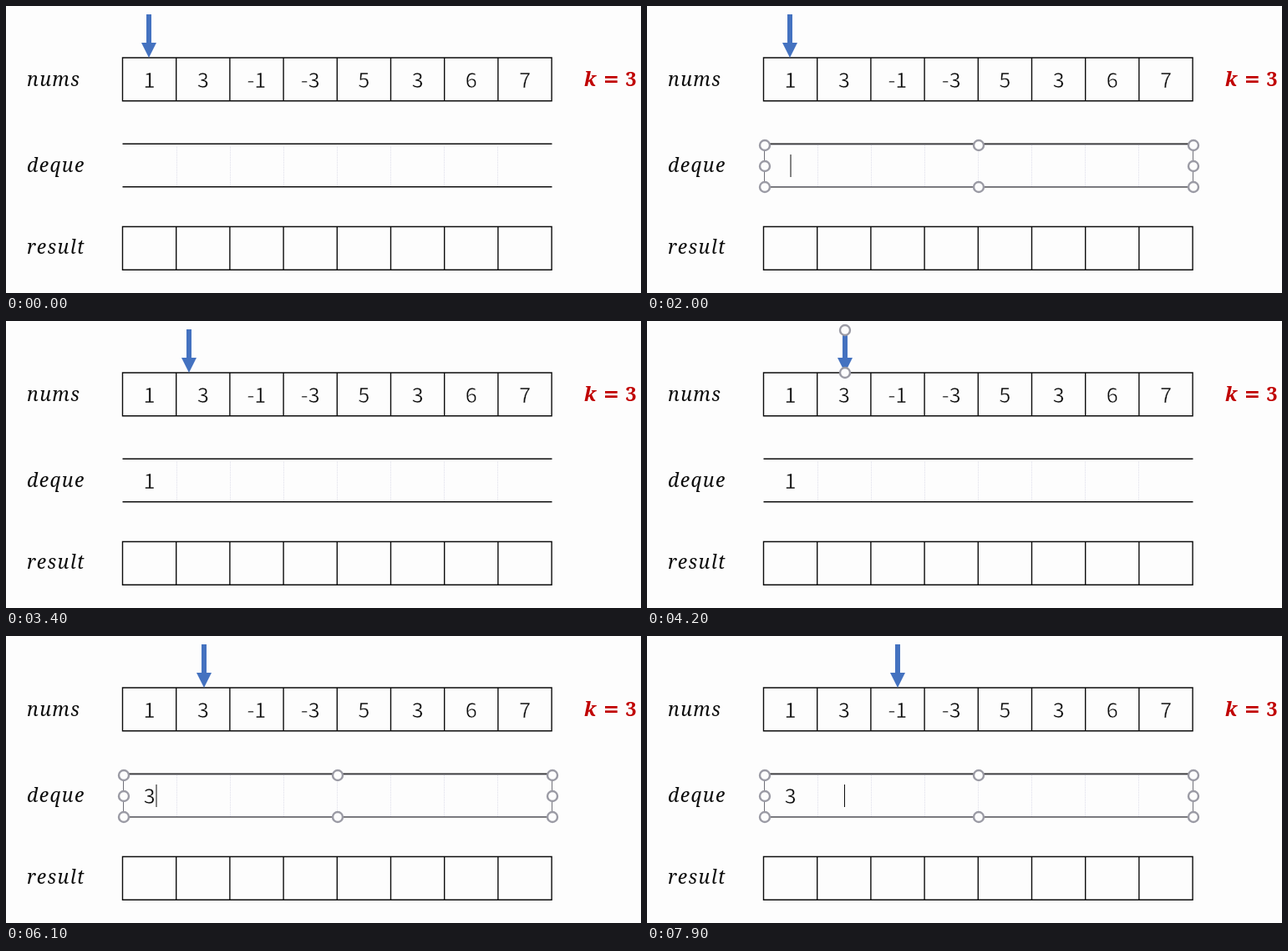
Recreate the animation shown at these times as an HTML page. Size 760 by 344 pixels, loop 8000 ms.

```html
<!DOCTYPE html>
<html lang="en">
<head>
<meta charset="utf-8">
<title>Sliding window maximum</title>
<style>
  html, body { margin: 0; width: 100%; height: 100%; overflow: hidden; background: #fdfdfd; }
  svg { display: block; width: 760px; height: 344px; }
  .line { fill: none; stroke: #0c0c0c; stroke-width: 1.4; }
  .faint { stroke: #dedeea; stroke-width: 1; stroke-dasharray: 1 1; }
  .digit { font: 300 25.5px "Noto Sans CJK SC", "Noto Sans CJK JP", "Noto Sans CJK", sans-serif; text-anchor: middle; fill: #0c0c0c; stroke: #fdfdfd; stroke-width: .5; }
  .label { font: italic 23px "Noto Serif", serif; letter-spacing: 1.4px; fill: #0c0c0c; }
  .k { font: bold 23.5px "Noto Serif", serif; fill: #c00000; }
  .knob { fill: #fdfdfd; stroke: #9a9aa4; stroke-width: 2.4; }
  .frame { fill: none; stroke: #707078; stroke-width: 1; }
</style>
</head>
<body>
<svg id="stage" viewBox="0 0 760 344">
  <text class="label" x="25" y="96">nums</text>
  <text class="label" x="25" y="199">deque</text>
  <text class="label" x="25" y="297">result</text>
  <text class="k"><tspan x="692" y="96" font-style="italic">k</tspan><tspan x="714.500" font-family="DejaVu Serif, serif">=</tspan><tspan x="741.500">3</tspan></text>
  <g id="grid"></g>
  <path d="M139.500 165.300H653.500M139.500 216.800H653.500" class="line"/>
  <text id="item" class="digit" x="171.500" y="201"></text>
  <g id="selection"><rect class="frame" x="140.500" y="166" width="513" height="50.500"/></g>
  <rect id="caret" y="178" height="27" fill="#0c0c0c"/>
  <g id="arrow">
    <path d="M-3 10H3V44H9L0 62L-9 44H-3Z" fill="#4472c0"/>
    <g id="ends"></g>
  </g>
</svg>
<script>
const $ = id => document.getElementById(id);
const LEFT = 139.5, CELL = 64.2, COUNT = 8, LOOP = 8000;

function add(parent, tag, attrs, text = "") {
  const el = document.createElementNS("http://www.w3.org/2000/svg", tag);
  for (const name in attrs) el.setAttribute(name, attrs[name]);
  el.textContent = text;
  parent.append(el);
}
const knob = (parent, cx, cy) => add(parent, "circle", { class: "knob", cx, cy, r: 6 });

for (const y of [62, 264.5]) {
  let d = `M${LEFT} ${y}h${CELL * COUNT}v51.8h${-CELL * COUNT}z`;
  for (let i = 1; i < COUNT; i++) d += `M${LEFT + i * CELL} ${y}v51.8`;
  add($("grid"), "path", { class: "line", d });
}
[1, 3, -1, -3, 5, 3, 6, 7].forEach((n, i) => {
  if (i) add($("grid"), "path", { class: "faint", d: `M${140.5 + i * 64} 167V216` });
  add($("grid"), "text", { class: "digit", x: LEFT + (i + .5) * CELL, y: 97.5 }, n);
});
for (const x of [141, 397, 654])
  for (const y of [167, 192, 217])
    if (x != 397 || y != 192) knob($("selection"), x, y);
for (const y of [11, 62]) knob($("ends"), 0, y);

// Each list holds [time, value] pairs
const arrowX = [[0, 171], [3000, 171], [3700, 255], [4100, 237], [6300, 237], [6600, 291], [6800, 300], [LOOP, 300]];
const itemAt = [[0, ""], [2300, "1"], [5200, ""], [5600, "3"]];
const caretX = [[0, 0], [2000, 172], [2300, 180], [2900, 0], [4800, 180], [5200, 172],
                [5600, 180], [6000, 0], [6100, 180], [6300, 0], [7600, 236.5]];

const hold = (keys, t) => keys.filter(k => k[0] <= t).pop()[1];
const within = (t, ...spans) => spans.some(([a, b]) => t >= a && t < b);
function glide(keys, t) {
  const i = keys.findIndex(k => k[0] > t), [t0, a] = keys[i - 1], [t1, b] = keys[i];
  return a + (b - a) * (t - t0) / (t1 - t0);
}
const show = (id, on) => $(id).setAttribute("visibility", on ? "visible" : "hidden");

function draw(now) {
  const t = Math.floor(now % LOOP / 100) * 100;
  const caret = hold(caretX, t), thick = within(t, [5200, 5600]);
  $("arrow").setAttribute("transform", `translate(${glide(arrowX, t)} 0)`);
  $("item").textContent = hold(itemAt, t);
  $("caret").setAttribute("x", caret - (thick ? 1 : .5));
  $("caret").setAttribute("width", thick ? 2 : 1);
  show("caret", caret);
  show("selection", within(t, [2000, 2900], [4700, 6300], [7500, LOOP]));
  show("ends", within(t, [4200, 4700], [7000, 7500]));
}

const start = performance.now();
function tick() {
  draw(performance.now() - start);
  requestAnimationFrame(tick);
}
tick();
</script>
</body>
</html>
```
